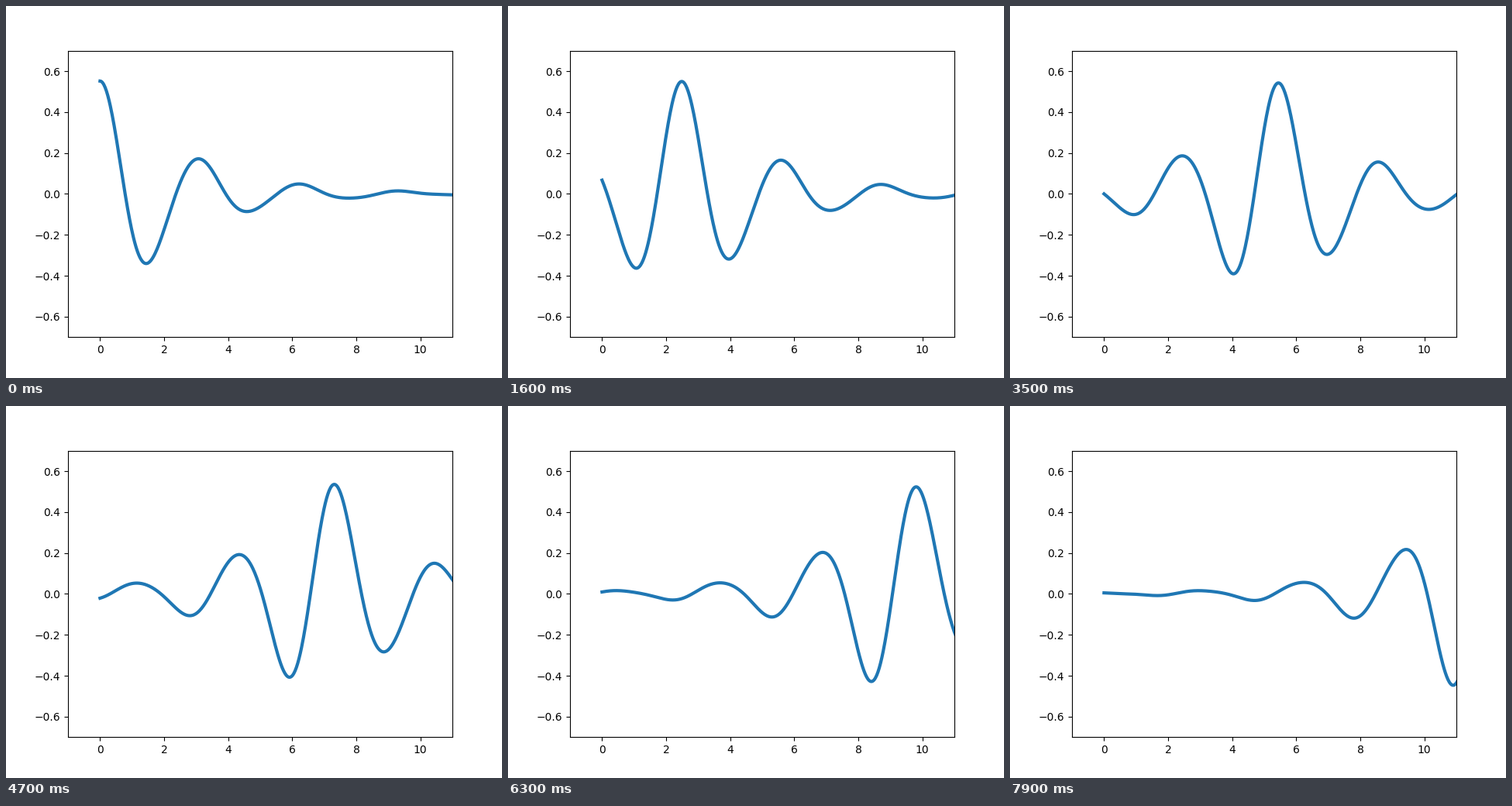
Recreate the animation shown at these times as a matplotlib script. Size 640 by 480 pixels, loop 8 s.

```python
import numpy as np
import matplotlib.pyplot as plt
from matplotlib.animation import FuncAnimation

FRAMES = 80
INTERVAL = 100
PERIODS = 4
CENTRE = 2.0
WIDTH = 0.4

# Lorentzian spectrum entering a weakly dispersive medium at x = 0
omega = np.linspace(0, 2 * CENTRE, 41)
weight = 0.5 * (omega[1] - omega[0]) / (1 + ((omega - CENTRE) / WIDTH) ** 2)
wavenumber = omega * (1 + 0.025 * (omega - CENTRE))

x = np.linspace(0, 12, 600)
phase = np.outer(x, wavenumber)


def pulse(t):
    return np.cos(phase - omega * t) @ weight


fig, ax = plt.subplots(figsize=(6.4, 4.8), dpi=100)
ax.set_xlim(-1, 11)
ax.set_ylim(-0.7, 0.7)
line, = ax.plot(x, pulse(0), lw=3)


def update(frame):
    t = 2 * np.pi / CENTRE * PERIODS * frame / FRAMES
    line.set_ydata(pulse(t))
    return line,


anim = FuncAnimation(fig, update, frames=FRAMES, interval=INTERVAL,
                     repeat=True, repeat_delay=0)
plt.show()
```
